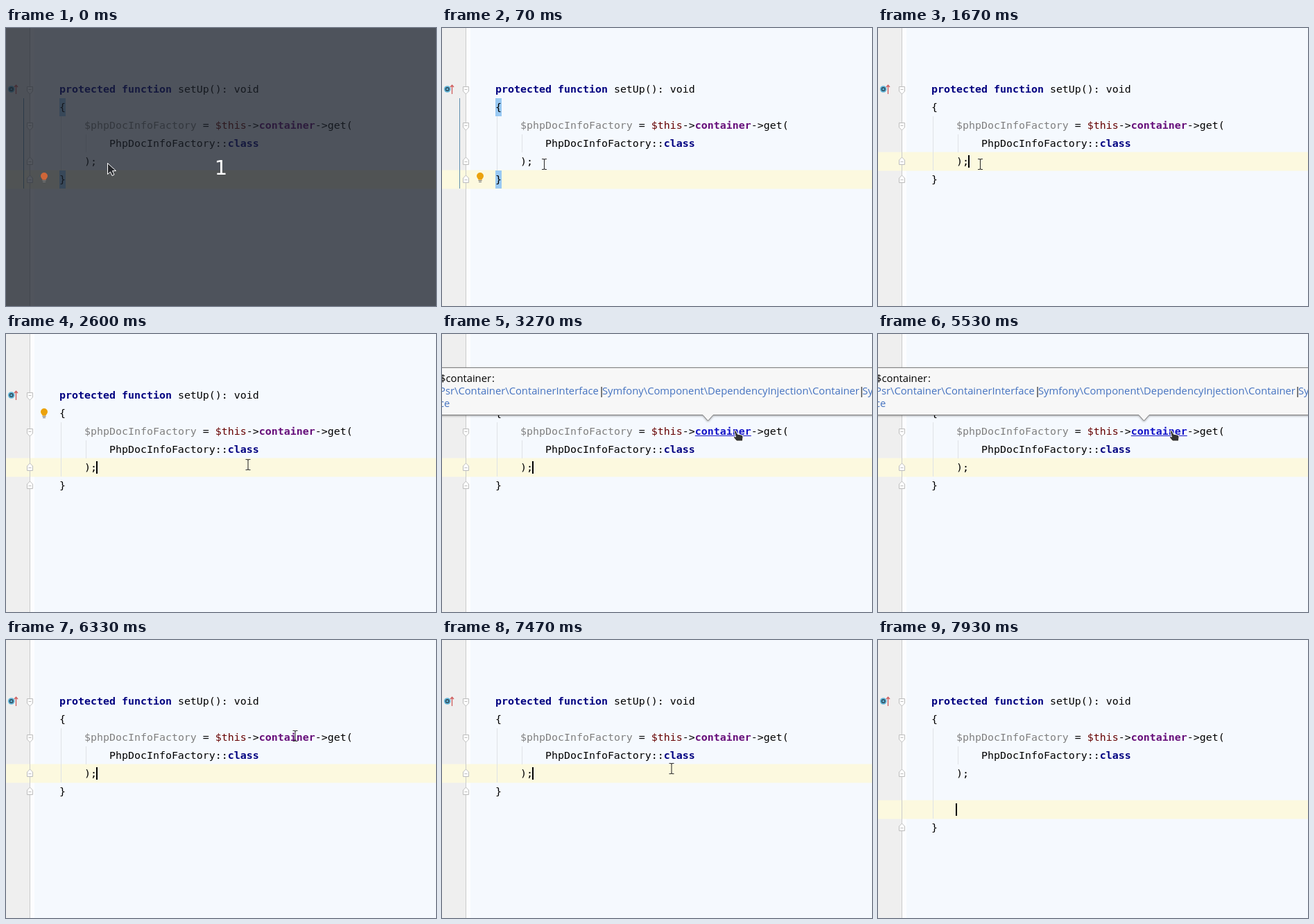
An HTML page for the animation above (8 s loop, 620x400 px).

```html
<!DOCTYPE html>
<html lang="en">
<head>
<meta charset="utf-8">
<style>
  html, body { margin: 0; width: 100%; height: 100%; overflow: hidden; background: #f5f9fe; }
  svg { position: absolute; left: 0; top: 0; width: 620px; height: 400px; }
  pre { position: absolute; left: 77px; margin: 0; color: #000; font: 14.95px/26px "DejaVu Sans Mono", monospace; }
  #code { top: 75px; }
  #end { top: 205px; }
  .key { font-weight: bold; color: #000080; }
  .local { color: #808080; }
  .self { color: #660000; }
  .field { font-weight: bold; color: #660e7a; }
  .field.link { color: #1414c8; text-decoration: underline 1px; text-underline-offset: 1px; }
  .tip { font: 14.78px "Open Sans", "Noto Sans", sans-serif; }
  .type { fill: #4472c0; }
  .fold { fill: #fff; stroke: #bcbcbc; }
  .guide { stroke: #dfe2e6; }
  #popup { filter: drop-shadow(0 1px 1.5px rgba(0, 0, 0, .35)); }
</style>
</head>
<body>
<svg viewBox="0 0 620 400">
  <defs>
    <path id="open" class="fold" d="M30.5 84.5h8v6.5l-4 4-4-4zM32.5 88.5h4"/>
    <path id="close" class="fold" d="M30.5 196.5h8v-6.5l-4-4-4 4zM32.5 192.5h4"/>
  </defs>

  <rect width="620" height="400" fill="#f5f9fe"/>
  <rect width="34" height="400" fill="#efefef"/>
  <rect x="35" width="6" height="400" fill="#fcfdff"/>
  <rect id="row" y="-.5" width="620" height="27" fill="#fcf9df"/>
  <path d="M34.5 0V400" stroke="#cbcbcb"/>

  <g id="braces">
    <path d="M77 101h9v26h-9zM77 205h9v26h-9z" fill="#99c9f3"/>
    <path d="M25.5 101V231" stroke="#5f8fae"/>
  </g>
  <path id="guide" class="guide"/>
  <path class="guide" d="M115.5 153V179"/>

  <use href="#open"/>
  <use href="#open" y="52"/>
  <use href="#close"/>
  <use id="endFold" href="#close" y="26"/>
  <circle cx="7.7" cy="88" r="4.8" fill="#62b5d8"/>
  <circle cx="7.7" cy="88" r="2.3" fill="none" stroke="#2f4a5a" stroke-width="1.4"/>
  <path d="M14.5 95V82.5M12 85l2.5-2.8 2.5 2.8" fill="none" stroke="#cf5d5d" stroke-width="1.3"/>
</svg>

<pre id="code"><span class="key">protected function</span> setUp(): void
{
    <span class="local">$phpDocInfoFactory</span> = <span class="self">$this</span>-&gt;<span id="field" class="field">container</span>-&gt;get(
        PhpDocInfoFactory::<span class="key">class</span>
    );</pre>
<pre id="end">}</pre>

<svg viewBox="0 0 620 400">
  <path id="caret" d="M0 4h2v18h-2z"/>

  <g id="popup">
    <path d="M-5 48.5H625V116.5H391l-7.5 8.5-7.5-8.5H-5z" fill="#f7f7f7" stroke="#808080"/>
    <g class="tip">
      <text x="-3" y="69">$container</text>
      <text x="72" y="69">:</text>
      <text class="type" x="-4" y="87">Psr\Container\ContainerInterface</text>
      <text x="226" y="87">|</text>
      <text class="type" x="231" y="87">Symfony\Component\DependencyInjection\Container</text>
      <text x="601" y="87">|</text>
      <text class="type" x="606" y="87">Symfony</text>
      <text class="type" x="-4" y="105">ce</text>
    </g>
  </g>

  <path id="shade" d="M0 0H620V400H0z" fill="#1b202a" fill-opacity=".76"/>
  <g id="bulb">
    <path id="glass" d="M52.5 218.5c0-1.5-2.5-3-2.5-5.5a5 5 0 0 1 10 0c0 2.5-2.5 4-2.5 5.5z"/>
    <path d="M52.5 219.5h5M53 221.5h4" stroke="#777"/>
  </g>
  <g id="count">
    <text x="310" y="211" text-anchor="middle" fill="#fff" font-family="DejaVu Sans, sans-serif" font-size="29">1</text>
    <path d="M146.5 194.5v16l4-3.5 2.5 5.5 3-1.5-2.5-5.5h5z" fill="#26282c" stroke="#fff"/>
  </g>

  <path id="beam" d="M-3.5-7.5h2.5l1 1 1-1h2.5M0-6.5V6.5M-3.5 7.5h2.5l1-1 1 1h2.5" fill="none" stroke="#333" stroke-width="1.1"/>
  <path id="hand" d="M-6-7.5q1.8-1.5 3.2.5l1.8 4 6 1.2q2.2.8 2 3.3l-.6 5.500h-8.500l-4.400-5q-.6-2 1.500-1.500l1.500.5z" fill="#333" stroke="#fff"/>
</svg>
<script>
const $ = id => document.getElementById(id);
const FPS = 15, LOOP = 8000;

// Pointer: tick, x, y
const path = [
  [1, 147.5, 196], [30, 147.5, 196], [39, 349, 188], [42, 349, 188],
  [43, 390, 166], [44, 427, 147], [85, 427, 147], [86, 433, 148],
  [91, 433, 148], [92, 428, 141], [94, 428, 141], [95, 417, 138],
  [96, 417, 138], [106, 338, 177], [111, 338, 177], [112, 331, 185]
];
// The caret shows at the first tick, hides at the next, and so on
const blinks = [25, 33, 39, 54, 62, 72, 76, 83, 91, 98, 112];

function pointer(n) {
  const i = path.findIndex(k => k[0] > n);
  if (i < 0) return path.at(-1).slice(1);
  if (!i) return path[0].slice(1);
  const [a, ax, ay] = path[i - 1], [b, bx, by] = path[i];
  const u = (n - a) / (b - a);
  return [ax + (bx - ax) * u, ay + (by - ay) * u];
}

const show = (id, on) => $(id).style.display = on ? "" : "none";
const move = (id, x, y) => $(id).style.transform = `translate(${x}px, ${y}px)`;
const within = (n, a, b) => n >= a && n < b;

function draw(t) {
  const n = Math.floor((t + 5) * FPS / 1000);
  const added = n >= 119 ? 2 : n >= 116 ? 1 : 0;
  const row = n < 25 ? 5 : 4 + added;
  const top = 75 + 26 * row;
  const link = within(n, 44, 92);
  const [x, y] = pointer(n);

  move("row", 0, top);
  move("end", 0, 26 * added);
  move("endFold", 0, 26 * added);
  $("guide").setAttribute("d", `M79.5 127V${205 + 26 * added}`);
  show("braces", n < 25);

  show("caret", blinks.filter(b => b <= n).length % 2);
  move("caret", added ? 112 : 130, top);

  show("bulb", n < 25 || within(n, 30, 43));
  move("bulb", 0, n < 25 ? 0 : -101);
  $("glass").setAttribute("fill", n ? "#eba20c" : "#cf6638");

  $("field").classList.toggle("link", link);
  show("popup", within(n, 49, 91));
  show("shade", !n);
  show("count", !n);

  show("beam", n && !link && !added);
  show("hand", link);
  move("beam", x, y);
  move("hand", x, y);
}

function tick() {
  draw(performance.now() % LOOP);
  requestAnimationFrame(tick);
}
tick();
</script>
</body>
</html>
```
